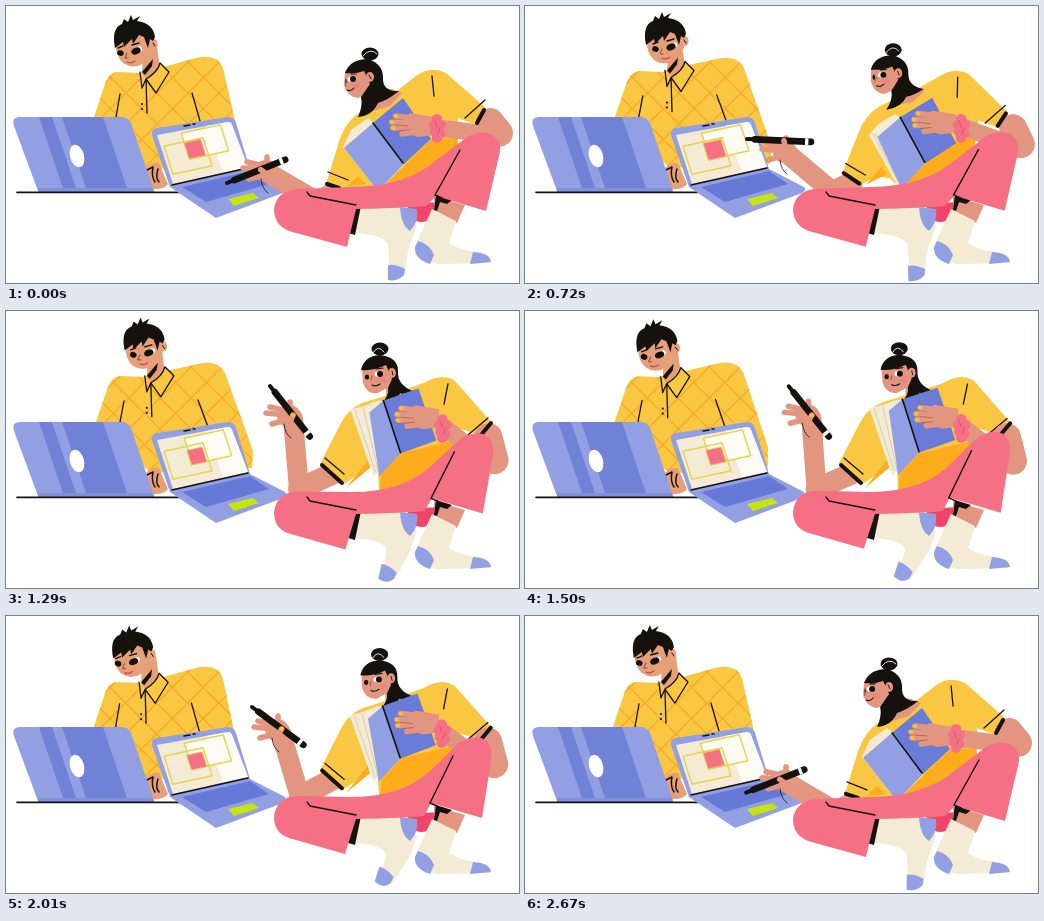
These frames come from a looping animation (513 px wide and 277 px high, 2.7 s). An HTML page with a canvas:

```html
<!DOCTYPE html>
<html lang="en">
<head>
<meta charset="utf-8">
<title>Studying together</title>
<style>
html, body { margin: 0; overflow: hidden; background: #fff; }
canvas { display: block; }
</style>
</head>
<body>
<canvas id="stage" width="513" height="277"></canvas>
<script>
const ctx = document.getElementById('stage').getContext('2d');
const LOOP = 2700, STEP = 30;
const TIMES = [0, 330, 720, 1290, 1680, 2010];
const INK = '#15120d', YELLOW = '#fac743', ORANGE = '#fdac1c', PINK = '#f57085', CREAM = '#f3ebd4',
  LIGHT = '#92a0e3', BLUE = '#6a7cd7', SKIN = '#e29680', TAN = '#e59f79', NAIL = '#fbc02d';

// Poses at TIMES
const TRACKS = {
  head: [0, .52, 1, .8, -.1, -.15],
  shirt: [0, .12, .95, 1, .4, -.1],
  lean: [0, .1, .42, 1, 1.04, .96],
  sway: [0, .45, 1, .1, 0, 0],
  sleeve: [0, .04, .45, 1, 1, .98],
  knee: [0, .02, .08, .8, 1.2, 1],
  toe: [0, -.2, -.1, .7, 1.05, .95],
  mark: [8.2, 12, 8.7, 7.5, 7.7, 7.6],
  elbowX: [312, 315, 308, 293, 291, 294],
  elbowY: [196, 195, 186, 178, 178, 181],
  handX: [258, 261, 258, 281, 279, 269],
  handY: [163, 162, 144, 103, 102, 112],
  tipX: [221, 221, 222, 264, 263, 246],
  tipY: [177, 177, 133, 75, 76, 91],
  endX: [281, 281, 288, 305, 305, 299],
  endY: [153, 151, 136, 127, 127, 130]
};

// Periodic monotone cubic through the poses
function sample(values, t) {
  const n = values.length;
  const time = i => TIMES[(i + n) % n] + LOOP * Math.floor(i / n);
  const value = i => values[(i + n) % n];
  const slope = i => (value(i + 1) - value(i)) / (time(i + 1) - time(i));
  const tangent = i => {
    const a = slope(i - 1), b = slope(i);
    return a * b <= 0 ? 0 : 2 * a * b / (a + b);
  };
  let i = n - 1;
  while (TIMES[i] > t) i--;
  const h = time(i + 1) - time(i), s = (t - time(i)) / h, r = 1 - s;
  return value(i) * (1 + 2 * s) * r * r + value(i + 1) * s * s * (3 - 2 * s)
    + h * s * r * (tangent(i) * r - tangent(i + 1) * s);
}

// Blend two paths of the same structure
function mix(a, b, t) {
  const ends = b.match(/[\d.]+/g);
  let i = 0;
  return a.replace(/[\d.]+/g, v => (+v + (ends[i++] - v) * t).toFixed(2));
}
const lerp = (a, b, t) => a + (b - a) * t;

function fill(path, color) {
  ctx.fillStyle = color;
  ctx.fill(new Path2D(path));
}
function line(path, color = INK, width = 1.3) {
  ctx.strokeStyle = color;
  ctx.lineWidth = width;
  ctx.stroke(new Path2D(path));
}
function oval(x, y, rx, ry, color, angle = 0) {
  ctx.fillStyle = color;
  ctx.beginPath();
  ctx.ellipse(x, y, rx, ry, angle, 0, 2 * Math.PI);
  ctx.fill();
}
function shifted(x, y, draw) {
  ctx.save();
  ctx.translate(x, y);
  draw();
  ctx.restore();
}
function finger(x, y, toX, toY, nail) {
  line(`M${x},${y} L${toX},${toY}`, SKIN, 5.5);
  if (nail) oval(toX, toY, 2.6, 1.8, NAIL, .2);
}

function drawMan(p) {
  const s = p.shirt;
  const shirt = mix('M88,111 L100,75 Q104,66 112,66 L134,67 L154,62 L190,52 Q211,47 217,62 L232,128 L232,165 L140,162Z',
    'M90,111 L102,76 Q106,66 114,65 L138,66 L160,60 L192,53 Q212,48 219,62 L247,140 L246,157 L145,162Z', s);
  fill(shirt, YELLOW);
  ctx.save();
  ctx.clip(new Path2D(shirt));
  ctx.translate(3 * s, 0);
  for (let x = -20; x < 320; x += 31) {
    line(`M${x},40 L${x + 125},165`, '#f9a526', 1.2);
    line(`M${x},165 L${x + 125},40`, '#f9a526', 1.2);
  }
  ctx.restore();
  line(mix('M186,87 L194,115', 'M192,89 L202,116', s));
  line(mix('M114,88 L110,111', 'M118,90 L114,111', s));

  shifted(p.head * 6, -p.head * 1.5, () => {
    fill('M137,50 L151,40 L154,62 L141,73 L136,67Z', TAN);
    fill('M136,66 L147,53 L146,60 L139,69Z', INK);
    fill('M134,66 L140,73 L136,82Z M154,57 L163,66 L150,87 L140,73 Q152,66 154,57Z', YELLOW);
    line('M134,66 L136,82 L140,73 Q152,66 154,57 L163,66 L150,87 L140,73 L141,107');
    oval(136, 98, 1.1, 1.1, INK);
    oval(136, 103, 1.1, 1.1, INK);
  });

  shifted(p.head * 12, -p.head * 3, () => {
    oval(148, 38, 3.5, 5, TAN);
    fill('M110,36 Q109,50 117,57 Q127,64 138,57 L147,45 L146,28 L115,28Z', TAN);
    fill('M109,42 Q105,22 116,18 L118,13 L122,16 L125,9 L127,14 L134,10 L131,15 Q147,17 149,31 L147,35 L144,33 L142,42 L138,31 L133,29 L127,38 L126,33 L118,41 L117,36Z', INK);
    line('M147,37 L149,40', INK, 1);
    shifted(p.head * 4, -p.head, () => {
      oval(132.5, 43.5, 4, 2.8, '#fff', -.4);
      oval(130, 45, 4.8, 3.2, INK, -.4);
      oval(114.5, 47, 3.4, 2.8, INK, .4);
      line('M112,42 L117,40 M126,39 L133,37', INK, 1.4);
      line('M121,47 L119,52 L122,52', '#8a4a35', 1);
      line('M121,56 Q125,58 129,55', '#d4415c', 1.2);
    });
  });

  fill('M138,164 Q146,155 153,157 L162,178 Q158,184 146,183Z', TAN);
  line('M141,164 L147,161 Q145,170 149,176 M152,163 Q149,172 153,176', INK, 1.5);
}

function drawBackLaptop() {
  fill('M13,111 L116,111 Q122,111 125,117 L148,185 L32,185 L8,120 Q5,112 13,111Z', LIGHT);
  fill('M33,111 L46,111 L71,185 L58,185Z M56,111 L97,111 L122,185 L81,185Z', '#7081d6');
  fill('M32,182 L147,182 L148,186 L32,186Z', '#7f90dc');
  oval(71, 150, 7, 11.5, '#fff', -.28);
  line('M11,186.4 L173,186.4', INK, 1.6);
}

function tilted(x, y, w, h) {
  const corner = (a, b) => `${x + a * w / 2 + b * h * .16},${y - a * w * .11 + b * h / 2}`;
  return `M${corner(-1, -1)} L${corner(1, -1)} L${corner(1, 1)} L${corner(-1, 1)}Z`;
}

function drawFrontLaptop(p) {
  fill('M151,122 L222,111 Q228,111 230,117 L244,163 L279,181 Q282,184 277,187 L210,212 L164,181 L146,129 Q145,123 151,122Z', LIGHT);
  fill('M151,129 L222,116 Q225,116 226,119 L242,161 L167,178Z', CREAM);
  fill('M200,120 L222,116 Q225,116 226,119 L242,161 L217,166Z', '#fdfbf4');
  const x = 199 + p.lean * 3;
  fill(tilted(x, 136, 39, 26), '#fdfbf4');
  line(tilted(182, 150, 39, 28), '#e6d451', 1.4);
  line(tilted(x, 136, 39, 26), '#e6d451', 1.4);
  const mark = tilted(189 + p.lean * 2, 143 + p.lean * 2, p.mark * 2, p.mark * 1.95);
  fill(mark, PINK);
  line(mark, '#e4c75a', 1);
  line('M166,179 L242,162', INK, 1.5);
  line('M178,120 L184,119 M187,118 L189,118', INK, 1.5);
  fill('M176,181 L244,165 L263,178 L200,196Z', '#6679d6');
  fill('M222,193 L247,187 L253,192 L228,200Z', '#c6e40f');
}

function drawPenArm(p) {
  const {handX: x, handY: y, tipX, tipY, endX, endY} = p;
  const at = t => [lerp(tipX, endX, t), lerp(tipY, endY, t)];
  const sleeve = mix('L326,188', 'L328,162', p.sleeve);
  line(`M${p.elbowX},${p.elbowY} ${sleeve}`, SKIN, 22);
  line(`M${x + 6},${y + 5} L${p.elbowX},${p.elbowY}`, SKIN, 20);
  oval(x + 2, y + 2, 12, 11, SKIN);
  finger(x + 3, y - 4, x + 3, y - 12);
  finger(x, y - 3, x - 17, y - 7);
  finger(x, y + 1, x - 21, y - 1);
  finger(x, y + 6, x - 15, y + 10);
  line(`M${tipX},${tipY} L${at(.2)}`, INK, 4);
  line(`M${at(.12)} L${at(.97)}`, INK, 6.6);
  ctx.lineCap = 'butt';
  line(`M${at(.88)} L${at(.93)}`, '#fff', 6.6);
  ctx.lineCap = 'round';
  finger(x + 4, y + 6, ...at(.56), p.sleeve > .6);
  line(`M${x - 3},${y + 10} Q${x - 2},${y + 20} ${x + 4},${y + 24}`, INK, .8);
}

function drawTorso(p) {
  const s = p.sleeve, w = p.lean;
  fill(mix('M320,178 L332,139 Q338,117 354,106 L392,84 L410,70 Q424,59 440,67 L480,102 L468,118 L452,112 L452,140 L415,180 L375,182 L360,182 L345,182 L335,182Z',
    'M314,153 L335,112 Q342,98 356,92 L395,80 L418,72 Q436,61 449,70 L486,112 L474,124 L455,118 L448,140 L412,180 L373,180 L372,160 L364,155 L338,173Z', (s + w) / 2), YELLOW);
  fill(mix('M374,182 L398,160 L425,134 L452,132 L450,148 L415,180Z',
    'M374,180 L375,164 L395,142 L448,130 L446,146 L412,180Z', w), ORANGE);
  fill(mix('M342,180 L352,170 L360,178Z', 'M340,177 L362,149 L365,156Z', s), ORANGE);
  line(mix('M321,178 L333,182', 'M316,154 L336,172', s), INK, 4);
  line(mix('M322,166 L342,174', 'M319,147 L338,163', s));
  line(mix('M426,70 L428,90', 'M442,73 L438,93', w));
  line(mix('M459,112 L479,94', 'M462,124 L482,107', w));
}

function drawWomanHead(p) {
  const w = p.lean, x = (a, b) => lerp(a, b, w);
  fill(mix('M362,80 L386,83 L396,87 L384,100 L364,106Z', 'M380,72 L396,76 L404,82 L394,90 L380,90Z', w), SKIN);
  fill(mix('M339,66 L338,78 Q341,91 352,92 L366,86 L370,62 L350,58Z',
    'M356,58 L357,72 Q361,84 372,82 L386,74 L389,52 L365,48Z', w), SKIN);
  fill(mix('M339,67 Q344,53 362,53 Q378,58 377,74 Q378,86 393,85 Q382,94 372,97 Q366,110 352,111 Q357,100 355,91 L364,78 L358,65 Q350,68 339,67Z',
    'M355,59 Q358,45 374,44 Q392,46 392,60 Q391,74 407,80 Q396,84 394,82 Q393,88 374,94 Q384,84 382,77 L386,68 L380,54 Q368,60 355,59Z', w), INK);
  oval(x(364, 386), x(71, 62), 4, 5, SKIN);
  line(mix('M363,69 L365,73', 'M386,60 L387,64', w), INK, .9);
  oval(x(364, 374), x(48, 38), 8.5, 6.5, INK);
  line(mix('M357,50 Q364,41 371,48', 'M367,42 Q372,33 378,41', w), '#d9dcec', 1);
  oval(x(340, 361), x(75, 66), x(.6, 2.2), 2.6, INK);
  oval(x(345, 372), x(73, 63), 3.4, 2.6, '#fff');
  oval(x(347, 374), x(73, 63), 3, 2.9, INK);
  line(mix('M345,68 L350,68', 'M370,58 L377,57', w), INK, 1.2);
  line(mix('M341,76 L339,80', 'M366,65 L365,69', w), '#a2523f', 1);
  oval(x(350, 378), x(80, 70), 3.5, 2.4, '#ee8478');
  line(mix('M341,84 Q345,86 348,82', 'M366,74 Q370,76 374,73', w), INK, 1.1);
}

function drawBook(w) {
  fill(mix('M337,141 L345,124 L362,112 L370,118 L398,159 L372,185Z',
    'M344,98 L356,95 L372,89 L377,90 L394,142 L367,165Z', w), CREAM);
  line(mix('M340,138 L370,178', 'M349,99 L369,160', w), '#d8cdb0', 1);
  line(mix('M339,140 L371,182', 'M357,97 L372,160', w), '#d8cdb0', 1);
  fill(mix('M338,142 L367,117 L398,158 L372,185Z', 'M363,101 L377,89 L394,142 L373,165Z', w), LIGHT);
  fill(mix('M367,117 L397,92 L425,133 L398,158Z', 'M377,89 L412,77 L430,129 L394,142Z', w), BLUE);
  line(mix('M367,117 L397,157', 'M377,89 L394,141', w), INK, 1.6);
}

function drawBookArm(p) {
  const w = p.lean, x = (a, b) => lerp(a, b, w);
  shifted(p.sway * 5, p.sway * 2, () => {
    line(mix('M484,116 L493,127', 'M482,126 L488,149', w), SKIN, 28);
    line(mix('M490,129 L432,122', 'M484,152 L438,116', w), SKIN, 17);
  });
  line(mix('M478,104 L471,117', 'M485,112 L475,124', w), INK, 4);
  shifted(x(410, 415) + p.sway, x(119, 106) + p.sway * 3, () => {
    fill('M18,-8 L-6,-12 L-14,-4 L-10,8 L2,12 L18,10Z', SKIN);
    finger(-2, -7, -20, -9, true);
    finger(-2, -2, -24, -3, true);
    finger(-2, 3, -23, 3, true);
    finger(0, 7, -14, 9);
    line('M-20,0 L-8,1 M-18,6 L-7,5', '#b4604f', .8);
  });
  shifted(x(431, 436) + p.sway * 3, x(122, 117) + p.sway * 2, () => {
    for (const [a, b] of [[0, -9], [-3, -3], [4, -3], [-2, 4], [3, 6], [0, 10]]) oval(a, b, 5.2, 4.8, PINK);
    line('M-2,-7 L0,-1 M3,0 L1,6', '#d94e6c', .9);
  });
}

function drawLegs(p) {
  const k = p.knee;
  fill('M400,198 L434,196 L427,212 Q416,219 408,214Z', '#f2436a');
  fill('M428,190 L459,199 L451,217 L428,206Z', SKIN);
  fill('M426,203 L450,215 L443,237 Q455,245 472,246 Q486,248 484,257 L432,258 Q411,255 409,240Z', CREAM);
  fill('M412,235 Q424,238 428,249 L424,258 Q408,253 409,241Z M467,246 Q484,247 485,256 L464,258Z', LIGHT);
  fill('M430,189 L446,194 L441,198 L434,196 L431,205 L428,204Z', INK);
  fill(mix('M350,198 L398,200 L411,220 L402,245 L399,266 Q392,276 384,273 L382,238 Q378,229 348,227Z',
    'M350,198 L398,200 L411,220 L405,238 L388,264 Q381,273 371,268 L380,240 Q380,229 348,227Z', p.toe), CREAM);
  fill(mix('M382,259 Q390,258 399,263 L398,269 Q392,276 382,274Z',
    'M373,250 Q381,253 387,261 L384,267 Q377,273 368,265Z', p.toe), LIGHT);
  fill('M394,201 L411,203 Q413,216 404,225 Q395,219 394,201Z', LIGHT);
  fill('M345,200 L355,200 L349,229 L342,227Z', INK);
  fill(mix('M290,183 L345,181 Q400,181 432,153 L461,131 Q480,121 491,133 Q496,140 493,150 L480,205 L430,190 L420,200 Q400,202 350,203 L341,241 L283,225 Q268,219 268,203 Q270,186 290,183Z',
    'M290,180 L345,181 Q400,181 428,151 L453,127 Q471,116 482,126 Q487,133 485,145 L476,202 L425,187 L418,200 Q400,202 350,203 L339,238 L283,222 Q268,217 268,201 Q270,182 290,180Z', k), PINK);
  line('M301,186 L304,190 L350,199');
  line(mix('M454,144 L429,189 L436,192', 'M447,140 L424,187 L431,190', k), INK, 1.4);
}

function frame(now) {
  const t = Math.floor(now % LOOP / STEP) * STEP;
  const pose = {};
  for (const name in TRACKS) pose[name] = sample(TRACKS[name], t);
  ctx.fillStyle = '#fff';
  ctx.fillRect(0, 0, 513, 277);
  ctx.lineCap = ctx.lineJoin = 'round';
  drawMan(pose);
  drawBackLaptop();
  drawFrontLaptop(pose);
  drawPenArm(pose);
  drawTorso(pose);
  drawWomanHead(pose);
  shifted(pose.sway * 4, pose.sway * 6, () => drawBook(pose.lean));
  drawBookArm(pose);
  drawLegs(pose);
}

const start = performance.now();
function tick() {
  frame(performance.now() - start);
  requestAnimationFrame(tick);
}
tick();
</script>
</body>
</html>
```
